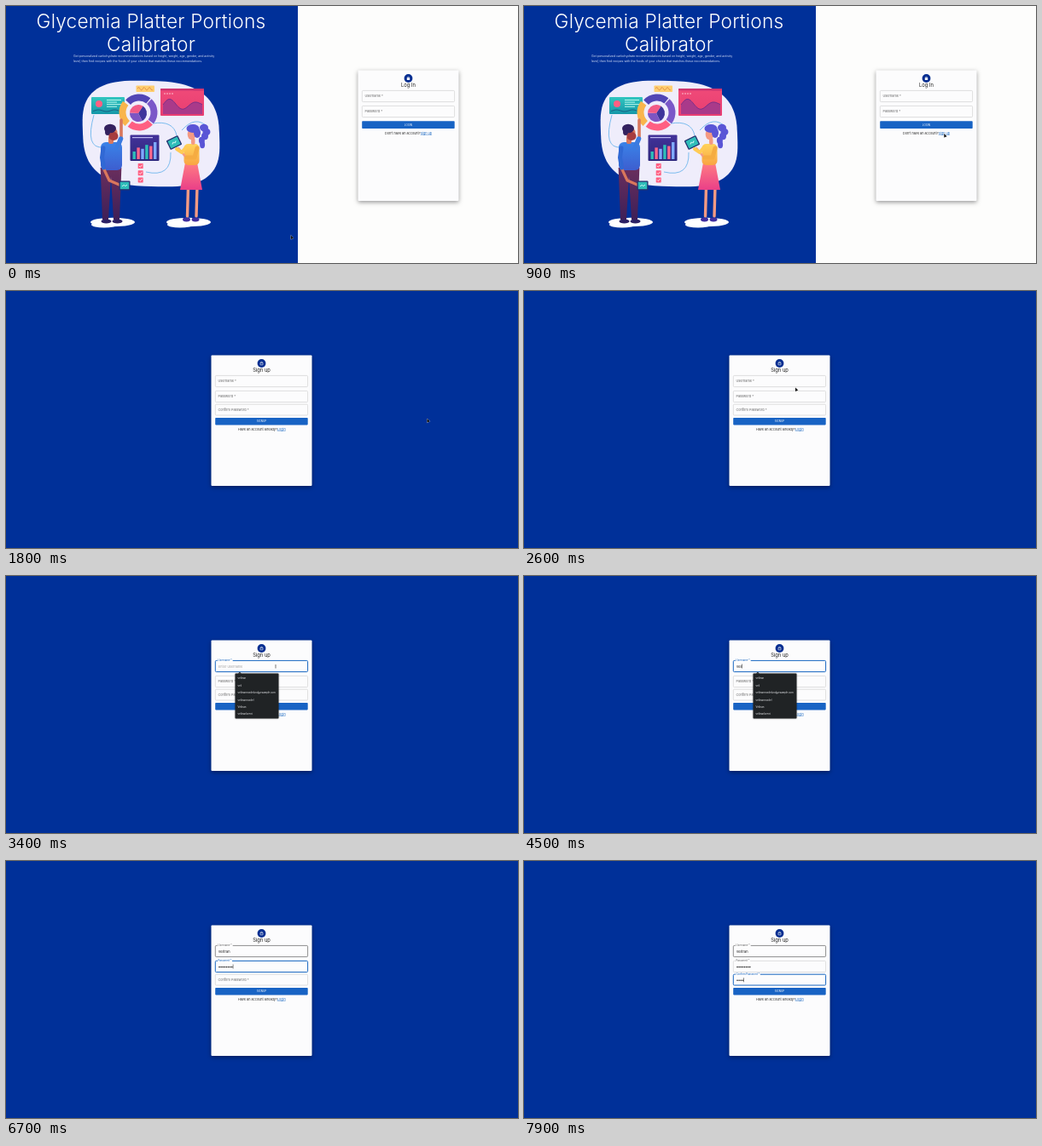
Write an HTML page with a canvas that moves like this. It is 600 px wide and 302 px high and loops after 8 s.

```html
<!DOCTYPE html>
<html lang="en">
<head>
<meta charset="utf-8">
<title>Sign up</title>
<style>
html, body { margin: 0; width: 100%; height: 100%; overflow: hidden; background: #003099; }
canvas { display: block; width: 100vw; height: 100vh; }
</style>
</head>
<body>
<canvas id="stage"></canvas>
<script>
const W = 600, H = 302, LOOP = 8000, STEP = 100, TAU = Math.PI * 2;
const BLUE = '#003099', LINK = '#1565c0', INK = '#222', CARD = '#fcfcfd';
const PINK = '#ff5f82', TEAL = '#2fbdb9', VIOLET = '#43329a', GOLD = '#f9b54c';
const FONT = 'Inter, "Open Sans", sans-serif';
const canvas = document.getElementById('stage');
const g = canvas.getContext('2d');
let scale = 1;

const clamp = v => Math.max(0, Math.min(1, v));
const easeOut = v => 1 - (1 - clamp(v)) ** 3;
const easeInOut = v => { v = clamp(v); return v * v * (3 - 2 * v); };
const lerp = (a, b, k) => a + (b - a) * k;
const times = (n, fn) => Array.from({ length: n }, (_, i) => fn(i));

function shape(fill, trace) {
  g.fillStyle = fill;
  g.beginPath();
  trace();
  g.fill();
}
function stroke(color, width, trace) {
  g.strokeStyle = color;
  g.lineWidth = width;
  g.beginPath();
  trace();
  g.stroke();
}
const box = (x, y, w, h, fill, r = 0) => shape(fill, () => g.roundRect(x, y, w, h, r));
const oval = (x, y, rx, ry, fill) => shape(fill, () => g.ellipse(x, y, rx, ry, 0, 0, TAU));
const poly = (points, fill) => shape(fill, () => points.forEach(p => g.lineTo(...p)));
const line = (points, color, width) => stroke(color, width, () => points.forEach(p => g.lineTo(...p)));
const ring = (x, y, r, a, b, color, width) => stroke(color, width, () => g.arc(x, y, r, a, b));
const curve = (a, b, c, color) => stroke(color, 0.7, () => { g.moveTo(...a); g.quadraticCurveTo(...b, ...c); });
const plot = (x0, x1, f) => times(x1 - x0 + 1, i => [x0 + i, f(x0 + i)]);

// Upright body part, w0 wide at the top and w1 at the bottom.
function taper(x0, y0, w0, x1, y1, w1, fill) {
  poly([[x0 - w0 / 2, y0], [x0 + w0 / 2, y0], [x1 + w1 / 2, y1], [x1 - w1 / 2, y1]], fill);
}
function limb(points, color, width) {
  g.lineCap = g.lineJoin = 'round';
  line(points, color, width);
  g.lineCap = 'butt';
}
function fade(y0, y1, a, b) {
  const f = g.createLinearGradient(0, y0, 0, y1);
  f.addColorStop(0, a);
  f.addColorStop(1, b);
  return f;
}
function text(s, x, y, size, color, { align = 'left', weight = 400, gap = 0 } = {}) {
  g.font = `${weight} ${size}px ${FONT}`;
  g.letterSpacing = gap + 'px';
  g.textAlign = align;
  g.fillStyle = color;
  g.fillText(s, x, y);
  return g.measureText(s).width;
}
function shadowed(alpha, blur, drop, draw) {
  g.save();
  g.shadowColor = `rgba(0,0,0,${alpha})`;
  g.shadowBlur = blur * scale;
  g.shadowOffsetY = drop * scale;
  draw();
  g.restore();
}

function backdrop() {
  const bend = v => Math.sign(v) * Math.abs(v) ** 0.68;
  shape('#efedfb', () => times(90, i => {
    const a = i / 90 * TAU, k = 1 + 0.04 * Math.sin(2 * a);
    g.lineTo(170 + 80 * k * bend(Math.cos(a)), 150 + 62 * k * bend(Math.sin(a)));
  }));
  curve([103, 128], [92, 168], [114, 166], '#4aa7e8');
  curve([172, 138], [196, 134], [200, 152], '#4aa7e8');
  curve([206, 146], [222, 128], [236, 142], '#4aa7e8');
  curve([164, 195], [194, 202], [193, 172], '#4aa7e8');
  for (const x of [125, 214]) {
    oval(x, 254, 26, 5.2, '#fff');
    oval(x - 10, 257, 15, 3.5, '#fff');
  }
}

function charts() {
  box(100, 107, 39, 20, fade(107, 127, '#32c6c0', '#1597a8'), 1);
  oval(109, 115, 4, 4, PINK);
  times(4, i => box(118, 110 + i * 2.6, 17 - i % 2 * 5, 0.9, '#c9fff2'));
  line(plot(102, 136, x => 123 + Math.sin(x / 3)), '#175c80', 0.9);

  box(152.5, 93.5, 21.5, 7.5, '#ffcf70', 0.8);
  line(plot(154, 172, x => 97.3 + 1.8 * Math.sin(x)), '#e08848', 0.8);

  // donut: four parts with gaps
  ['#5145b5', '#7a58c8', PINK, GOLD].forEach((color, i) =>
    ring(156 - (i === 3 ? 2 : 0), 125, 17.5, -2.4 + i * 1.57, -0.9 + i * 1.57, color, 8));
  ['#3e359b', '#7d55c2', '#f35b86'].forEach((color, i) =>
    shape(color, () => { g.moveTo(155, 126); g.arc(155, 126, 10, -1 + i * 2.1, 1.1 + i * 2.1); }));

  const wave = x => 116 - 7 * Math.sin((x - 184) / 5) * Math.cos((x - 178) / 40);
  box(181, 97, 51, 32, fade(97, 129, '#f04a78', '#e83e72'), 1);
  box(181, 97, 51, 2.5, '#cf3570', 1);
  poly([[184, 127], ...plot(184, 230, wave), [230, 127]], '#a93a8a');
  line(plot(184, 230, wave), '#6b2c8a', 0.8);
  times(4, i => oval(186 + i * 3, 103, 0.8, 0.8, '#ffd0d8'));

  box(145.5, 151.5, 34, 30.5, fade(151, 182, VIOLET, '#2d287d'), 1);
  box(148, 154, 24, 1.2, '#bcb7ef');
  times(6, i => {
    const h = 9 + i * 1.6 + i % 2 * 3;
    box(148.5 + i * 4.9, 180 - h, 3.4, h, [TEAL, '#ff668b', '#7fa9ff'][i % 3]);
  });

  times(3, i => {
    const y = 185 + i * 8.2;
    box(154.7, y, 6, 6, PINK, 0.6);
    line([[156, y + 3], [157.3, y + 4.3], [159.6, y + 1.6]], '#fff', 0.8);
  });
}

function tablet(x, y, w, h, angle) {
  g.save();
  g.translate(x, y);
  g.rotate(angle);
  box(-w / 2, -h / 2, w, h, '#24306f', 1);
  box(-w / 2 + 1.3, -h / 2 + 1.3, w - 2.6, h - 2.6, TEAL);
  line(plot(-3, 3, v => Math.sin(v * 2)), '#e9ffff', 0.7);
  g.restore();
}

function man() {
  const skin = '#d9775c', shirt = fade(160, 192, '#3a83e8', '#3d5fd0'), trousers = fade(190, 250, '#6a2e5d', '#3f2058');
  for (const x of [116.5, 129.5]) {
    oval(x + 1, 253, 6, 2.4, '#2c2164');
    taper(x + (123 - x) * 0.1, 190, 13, x, 251, 7, trousers);
  }
  box(111, 160, 25, 33, shirt, 6);
  limb([[131, 167], [135, 154], [135, 134]], skin, 3.6);
  limb([[130, 167], [134.5, 156]], '#3a7be0', 5.5);
  limb([[114, 190], [121, 205], [135, 211]], skin, 3.2);
  limb([[114, 167], [112.5, 178], [114.5, 190]], '#3068d4', 5);
  tablet(139, 211, 13, 11, 0);
  box(120, 153, 6, 9, skin, 2);
  oval(125, 149, 5.5, 6.5, skin);
  oval(126, 153, 5.5, 5, '#a63c3f');
  oval(122, 144, 7, 5.2, '#33215e');
  oval(119, 148, 3, 4, '#33215e');
}

function woman() {
  const skin = '#f49a83', hair = '#5a55d6';
  for (const x of [212.5, 223]) {
    limb([[x + 1, 212], [x, 247]], skin, 3.4);
    oval(x - 1, 251, 4.5, 2.4, '#3f2f9f');
  }
  times(5, i => oval(232 + 3 * Math.sin(i * 1.4), 143 + i * 5, 5 - i * 0.5, 4.2, hair));
  taper(217, 184, 14, 217, 216, 26, fade(184, 216, '#ff7e83', '#ea3f88'));
  box(208.5, 162, 18, 25, fade(162, 187, '#ffd45c', '#f9a443'), 5);
  tablet(197, 160.5, 15, 12, -0.45);
  limb([[211, 178], [202, 167]], skin, 2.5);
  limb([[211, 166], [206, 172], [200, 168]], '#ffcb55', 4);
  limb([[224, 167], [221, 178], [212, 178]], '#f5ac42', 5);
  box(217, 155, 4.5, 8, skin, 2);
  oval(217.5, 151, 4.8, 6.2, skin);
  oval(219, 144, 7.5, 5, hair);
  oval(224, 149, 4, 6, hair);
}

function card(x, title) {
  shadowed(0.4, 5.5, 1.8, () => box(x, 75.5, 118, 153.5, CARD, 1));
  const mid = x + 59;
  oval(mid, 85, 4.9, 4.9, '#062e91');
  ring(mid, 84.3, 1.1, Math.PI, TAU, '#fff', 0.55);
  if (title === 'Log In') box(mid - 1.7, 84.2, 3.4, 2.7, '#fff', 0.3);
  else stroke('#fff', 0.55, () => g.rect(mid - 1.5, 84.4, 3, 2.4));
  text(title, mid, 95.4, 5.8, INK, { align: 'center' });
}

// lift: 0 = label inside the box, 1 = label sitting on its top edge
function field(x, y, h, label, { lift = 0, focus = false, dark = false } = {}) {
  stroke(focus ? LINK : dark ? '#444' : '#cacaca', focus ? 1 : 0.6, () => g.roundRect(x, y, 108.3, h, 1.2));
  const size = lerp(3.8, 2.9, lift);
  if (lift > 0.3) {
    g.font = `400 ${size}px ${FONT}`;
    box(x + 2.5, y - 1, g.measureText(label).width + 1.6, 2, CARD);
  }
  text(label, x + 3.2, lerp(y + h / 2 + 1.4, y + 1, lift), size, focus ? LINK : '#666');
}

function button(x, y, h, label) {
  box(x, y, 108.5, h, '#1863c4', 0.8);
  text(label, x + 54.2, y + h / 2 + 1.1, 3, '#fff', { align: 'center' });
}

function footer(ask, link, x, y) {
  const at = x + text(ask, x, y, 3.75, INK);
  const w = text(link, at, y, 3.75, LINK);
  box(at, y + 0.6, w, 0.35, LINK);
}

function arrow(x, y) {
  const tip = [[x, y], [x, y + 4.6], [x + 3.2, y + 3.2], [x, y]];
  line(tip, '#ddd', 0.6);
  poly(tip, '#111');
}
function hand(x, y) {
  box(x - 1.5, y + 1.7, 4.6, 3.2, '#222', 1);
  box(x - 0.4, y - 0.4, 1.8, 4, '#222', 0.8);
  box(x - 1, y + 2.2, 3.6, 2.2, '#fff', 0.8);
  box(x, y, 1, 3, '#fff', 0.5);
}
function glide(t, start, length, from, to) {
  const k = easeInOut((t - start) / length);
  arrow(lerp(from[0], to[0], k), lerp(from[1], to[1], k));
}

function loginPage(t) {
  box(0, 0, W, H, '#fdfdfc');
  box(0, 0, 342, H, BLUE);
  const head = { align: 'center', weight: 300, gap: 0.2 };
  text('Glycemia Platter Portions', 170, 26, 22.7, '#fff', head);
  text('Calibrator', 170, 52.6, 22.7, '#fff', head);
  text('Get personalized carbohydrate recommendations based on height, weight, age, gender, and activity', 79, 60.3, 3.5, '#d5def5');
  text('level, then find recipes with the foods of your choice that matches these recommendations.', 79, 66.2, 3.5, '#d5def5');
  backdrop();
  charts();
  man();
  woman();
  card(412.5, 'Log In');
  field(417.3, 99.4, 13.2, 'Username *');
  field(417.3, 117.4, 13.2, 'Password *');
  button(417.2, 135.3, 8.8, 'LOGIN');
  footer("Don't have an account?", 'Sign up', 444, 150.6);
  if (t >= 1000) {
    box(0, 299.8, 33, 2.2, '#0b1f52');
    hand(493.5, 149.6);
  } else {
    glide(t, 50, 850, [333.8, 269.5], [492.3, 150]);
  }
}

const USER = 'velitran';
const SAVED = [USER, 'veli', 'velitranmordelund@example.com', 'velitranmordel', 'Velitran', 'velitranlorent'];
const ROWS = [
  { y: 99.4, h: 13.2, label: 'Username *', hint: 'Enter username', focus: 2900, start: 4000, rate: 150, count: 8 },
  { y: 117.4, h: 13.2, label: 'Password *', hint: 'Enter password', focus: 5200, start: 5900, rate: 110, count: 8 },
  { y: 133.2, h: 12.8, label: 'Confirm Password *', hint: 'Confirm password', focus: 6900, start: 7500, rate: 133, count: 8 },
];
const typed = (row, t) => Math.max(0, Math.min(row.count, Math.floor((t - row.start) / row.rate) + 1));

function popup(x, y, w, h) {
  shadowed(0.35, 2, 0, () => box(x, y, w, h, '#202325', 0.8));
  poly([[x + 3.2, y + 0.2], [x + 5.4, y - 1.8], [x + 7.6, y + 0.2]], '#202325');
}

function entry(row, t, focus, secret) {
  const n = typed(row, t), mid = row.y + row.h / 2;
  field(245.3, row.y, row.h, row.label, {
    lift: easeOut((t - row.focus + 50) / 200), focus, dark: !secret && t >= 2800,
  });
  let w = 0;
  if (n && secret) {
    times(n, i => oval(250 + i * 2.1, mid + 0.6, 0.8, 0.8, INK));
    w = n * 2.1;
  } else if (n) {
    w = text(USER.slice(0, n), 249, mid + 1.6, 3.9, INK);
  } else if (focus) {
    text(row.hint, 249, mid + 1.5, 3.8, '#a5a5a5');
  }
  const since = t - (n ? row.start + (n - 1) * row.rate : row.focus);
  if (focus && since % 1000 < 500) box(249 + w, mid - 2.4, 0.5, 5, '#111');
}

function signupPage(t) {
  box(0, 0, W, H, BLUE);
  card(240.5, 'Sign up');
  button(245.2, 148.9, 8.5, 'SIGNUP');
  footer('Have an account already?', 'Login', 272, 163.8);

  const [user, pass] = ROWS;
  const active = ROWS.filter(row => t >= row.focus).length - 1;
  ROWS.forEach((row, i) => entry(row, t, i === active, i > 0));

  if (t >= 3100 && t < pass.focus) {
    const prefix = USER.slice(0, typed(user, t));
    const list = SAVED.filter(s => s.toLowerCase().startsWith(prefix));
    popup(268.5, 114.6, 51, list.length * 8.5 + 2);
    list.forEach((s, i) => text(s, 271.5, 121.2 + i * 8.45, 2.8, '#e8eaed'));
  }
  if (active === 1 && t < 6600) {
    popup(268.5, 132.6, 108.3, 26.2);
    text('Use suggested password', 272, 139.2, 2.9, '#fff', { weight: 600 });
    text('Wq7-Tz4mKx9RbLe', 330, 139.2, 2.8, '#bdc1c6');
    text("Trovyk will save this password in your Plovun Account. You won't", 272, 149.8, 2.9, '#9aa0a6');
    text('have to remember it.', 272, 154.6, 2.9, '#9aa0a6');
  }

  if (t < 2800) glide(t, 1800, 800, [493.5, 150], [318, 113.4]);
  else if (t < user.start) box(315.7, 104, 0.6, 4.5, INK);
}

function draw() {
  const dpr = window.devicePixelRatio || 1;
  const w = Math.round(innerWidth * dpr), h = Math.round(innerHeight * dpr);
  if (canvas.width !== w || canvas.height !== h) {
    canvas.width = w;
    canvas.height = h;
  }
  scale = w / W;
  g.setTransform(scale, 0, 0, h / H, 0, 0);
  const t = Math.floor(performance.now() % LOOP / STEP) * STEP;
  if (t < 1800) loginPage(t);
  else signupPage(t);
  requestAnimationFrame(draw);
}
draw();
</script>
</body>
</html>
```
